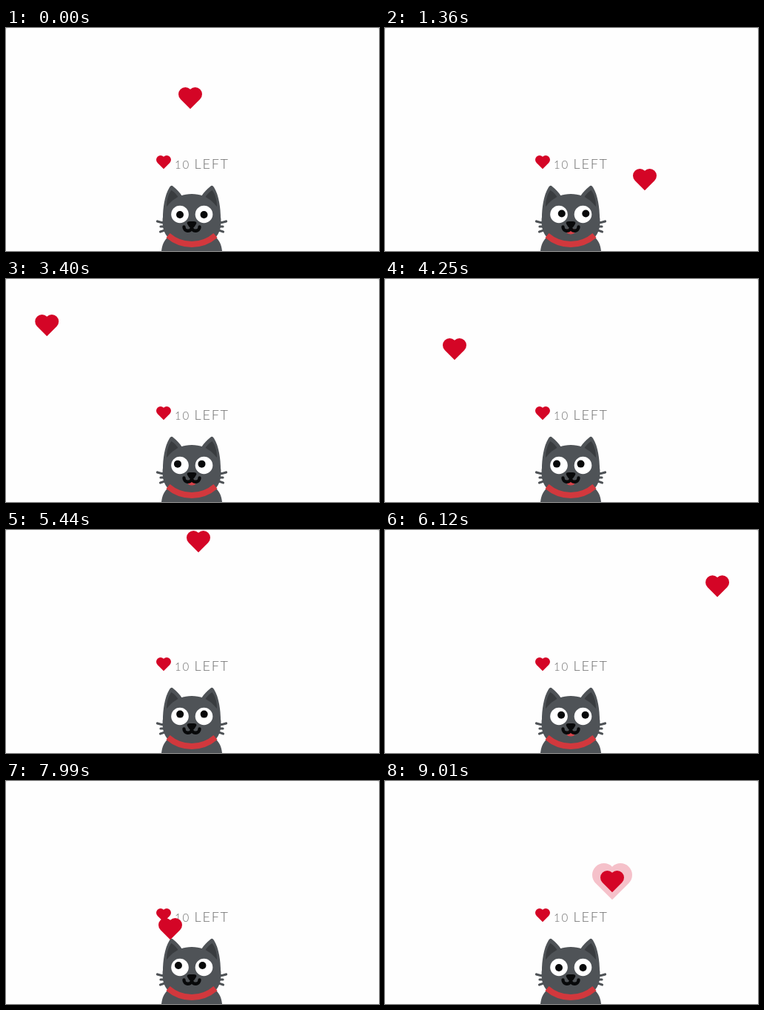
Recreate the animation shown at these times as an HTML page with a canvas. Size 504 px wide and 301 px high, loop 9.18 s.

```html
<!DOCTYPE html>
<html lang="en">
<head>
<meta charset="utf-8">
<title>Hungry cat</title>
<style>
  html, body { margin: 0; width: 100%; height: 100%; overflow: hidden; background: #fefefe; }
  canvas { display: block; width: 504px; height: 301px; }
</style>
</head>
<body>
<canvas id="stage" width="504" height="301"></canvas>
<script>
const c = document.getElementById('stage').getContext('2d');
const LOOP = 9180, HOLD = 850, STEP = 170;
const RED = '#d40526', FUR = '#4f5357', DARK = '#393c3f', BLACK = '#08090a';

// heart route: time, x, y
const route = [
  [850, 249, 95], [1360, 351, 205], [1700, 361, 214], [2040, 268, 226],
  [2550, 102, 199], [3060, 52, 140], [3570, 62, 40], [4250, 94, 95],
  [4840, 170, 90], [5440, 260, 16], [5870, 370, 30], [6290, 482, 112],
  [6800, 423, 198], [7400, 300, 228], [7990, 222, 200], [8500, 324, 172],
  [8840, 307, 136], [9010, 307, 136]
];

const clamp = v => Math.max(0, Math.min(1, v));

function slope(i, axis) {
  if (i === 0 || i >= route.length - 2) return 0;
  const a = route[i - 1], b = route[i + 1];
  return (b[axis] - a[axis]) / (b[0] - a[0]);
}

function heartAt(t) {
  if (t <= HOLD) return [249, 95];
  let i = 0;
  while (i < route.length - 2 && t > route[i + 1][0]) i++;
  const a = route[i], b = route[i + 1], d = b[0] - a[0];
  const u = clamp((t - a[0]) / d), u2 = u * u, u3 = u2 * u;
  return [1, 2].map(k =>
    (2 * u3 - 3 * u2 + 1) * a[k] + (u3 - 2 * u2 + u) * d * slope(i, k) +
    (3 * u2 - 2 * u3) * b[k] + (u3 - u2) * d * slope(i + 1, k));
}

function heart(x, y, width, color) {
  const s = width / (1 + Math.SQRT1_2), q = s * Math.SQRT2 / 4, r = s / 2;
  c.fillStyle = color;
  c.beginPath();
  c.moveTo(x, y + 2 * q);
  c.lineTo(x - 2 * q, y);
  c.arc(x - q, y - q, r, Math.PI * 0.75, Math.PI * 1.75);
  c.arc(x + q, y - q, r, Math.PI * 1.25, Math.PI * 2.25);
  c.closePath();
  c.fill();
}

function ellipse(x, y, rx, ry, color) {
  c.fillStyle = color;
  c.beginPath();
  c.ellipse(x, y, rx, ry, 0, 0, Math.PI * 2);
  c.fill();
}

function shape(d, color) {
  c.fillStyle = color;
  c.fill(new Path2D(d));
}

function line(d, color, width, cap = 'round') {
  c.strokeStyle = color;
  c.lineWidth = width;
  c.lineCap = cap;
  c.lineJoin = 'round';
  c.stroke(new Path2D(d));
}

// half of the symmetric parts, in cat coordinates centred on x = 0
function side(flip) {
  c.save();
  c.scale(flip, 1);
  line('M-35 263Q-41 263-46.5 261M-35 268H-42M-33 271Q-38 274-42.5 275', FUR, 3.2);
  shape('M-39 256C-39 244-37 226-30 215Q-27.5 211-25 214C-20 218-16 222-13 227Z', FUR);
  shape('M-34 241C-34 231-31 223-27.5 219C-23 222-20 225-18 229Z', DARK);
  c.restore();
}

function cat(gx, gy, open) {
  c.save();
  c.translate(251, 0);
  shape('M-41 301C-40 292-37 286-31 281H31C37 286 40 292 41 301Z', FUR);
  side(1);
  side(-1);
  shape('M0 224C22 224 39.5 240 39.5 261C39.5 271 37 277 32 283H-32C-37 277-39.5 271-39.5 261C-39.5 240-22 224 0 224Z', FUR);
  line('M-32 280Q-18 292 0 292Q18 292 32 280', '#d2383d', 8, 'butt');

  for (const x of [-16, 16.5]) {
    ellipse(x, 251.5, 11.8, 11.8, '#fff');
    ellipse(x + gx, 252 + gy, 5, 5, BLACK);
  }
  if (open > 0) ellipse(0, 274.5, 6, 4 * open, '#d9434a');
  line('M-10.5 268.5C-10.5 275-1.5 275.5 0 270C1.5 275.5 10.5 275 10.5 268.5', BLACK, 4.4);
  shape('M-6.5 263Q-6 261-3 261H3Q6 261 6.5 263Q5 268 0 271Q-5 268-6.5 263Z', BLACK);
  c.restore();
}

function label() {
  heart(213, 182, 20, RED);
  c.fillStyle = '#6c6c6c';
  c.textBaseline = 'alphabetic';
  c.letterSpacing = '1.8px';
  c.font = '300 15px Lato, sans-serif';
  c.fillText('10', 228, 190);
  c.letterSpacing = '1.8px';
  c.font = '300 18px Lato, sans-serif';
  c.fillText('LEFT', 254.5, 190);
}

function draw(t) {
  c.fillStyle = '#e6e6e6';
  c.fillRect(0, 0, 504, 301);
  c.fillStyle = '#fefefe';
  c.beginPath();
  c.roundRect(0, 0, 504, 310, 4);
  c.fill();

  const [x, y] = heartAt(t);
  const dx = x - 251, dy = y - 252, dist = Math.hypot(dx, dy) || 1;
  const look = clamp((t - HOLD) / 340) * clamp((9010 - t) / 340);
  const open = clamp((Math.abs(dx) - 56) / 45);

  label();
  cat(4.2 * look * dx / dist, 3.4 * look * dy / dist, open);
  const pulse = clamp((t - 8670) / 340);
  if (pulse > 0) heart(x, y + 2, 32 + 22 * pulse, 'rgba(216,0,39,.24)');
  heart(x, y + 1, 32, RED);
}

function frame(now) {
  const t = now % LOOP;
  draw(t < HOLD ? 0 : HOLD + Math.floor((t - HOLD) / STEP) * STEP);
  requestAnimationFrame(frame);
}
draw(0);
requestAnimationFrame(frame);
</script>
</body>
</html>
```
